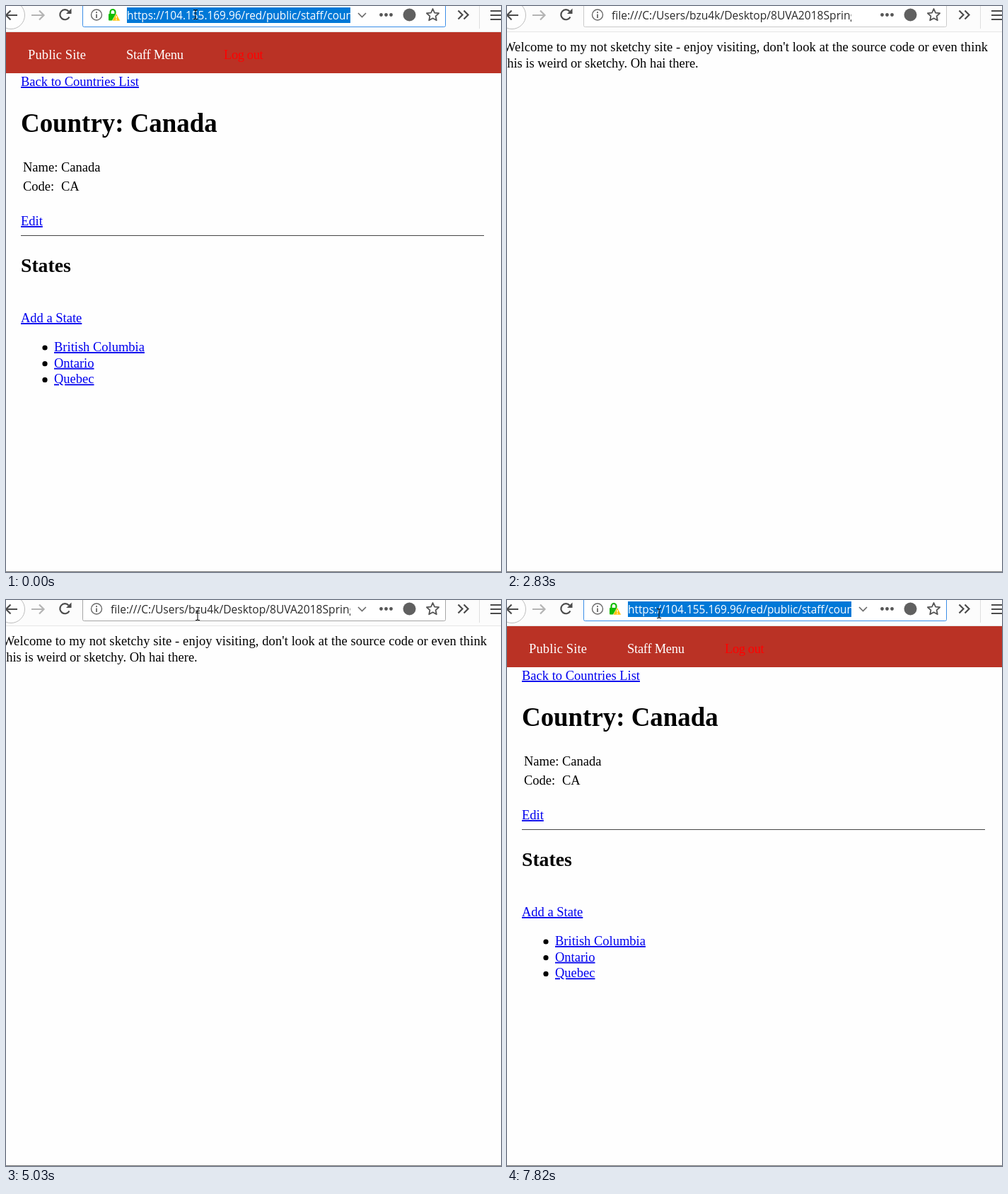
Animation of 700 by 800 pixels, one loop 8 s. Source, as an HTML page:

```html
<!DOCTYPE html>
<html lang="en">
<head>
<meta charset="utf-8">
<title>Browser tabs</title>
<style>
  html, body { margin: 0; width: 100%; height: 100%; overflow: hidden; background: #fefefe; }
  svg { display: block; }
  text { white-space: pre; }
  .page text { font-family: "Liberation Serif", "Times New Roman", serif; font-size: 18.5px; }
  .page .h1 { font-size: 36.9px; font-weight: bold; }
  .page .h2 { font-size: 27.7px; font-weight: bold; }
  .nav text { fill: #fff; }
  .nav .out { fill: #f00; }
  .link { fill: #00e; text-decoration: underline; }
  .url { font-family: "Open Sans", "Noto Sans", sans-serif; font-size: 15.4px; fill: #8b8b8b; }
  .url .host { fill: #111; }
  .file { font-size: 15.6px; fill: #2a2a2a; }
  .picked .url, .picked .host { fill: #fff; }
  .icon { fill: none; stroke: #4b4b4b; stroke-width: 2.2; }
</style>
</head>
<body>
<svg width="700" height="800" viewBox="0 0 700 800">
  <defs>
    <clipPath id="field"><rect x="145" y="0" width="342" height="29"/></clipPath>
  </defs>

  <g class="page" id="country">
    <rect y="37" width="700" height="58" fill="#ba3225"/>
    <g class="nav">
      <text x="31" y="74.5" letter-spacing=".12">Public Site</text>
      <text x="170" y="74.5" letter-spacing="-.27">Staff Menu</text>
      <text x="308" y="74.5" letter-spacing="-.4" class="out">Log out</text>
    </g>
    <text x="21" y="113" class="link">Back to Countries List</text>
    <text x="21" y="178" class="h1">Country: Canada</text>
    <text x="24" y="234">Name:</text><text x="78" y="234">Canada</text>
    <text x="24" y="261">Code:</text><text x="78" y="261">CA</text>
    <text x="21" y="310" class="link">Edit</text>
    <rect x="21" y="324" width="655" height="1" fill="#444"/>
    <text x="21" y="376" class="h2">States</text>
    <text x="21" y="447" class="link">Add a State</text>
    <g id="states"></g>
  </g>

  <g class="page" id="sketchy">
    <text x="-5" y="64" letter-spacing=".1">Welcome to my not sketchy site - enjoy visiting, don't look at the source code or even think</text>
    <text x="-5" y="87">this is weird or sketchy. Oh hai there.</text>
  </g>

  <rect y="799" width="700" height="1" fill="#777"/>

  <g id="toolbar">
    <rect width="700" height="37" fill="#fcfcfc"/>
    <rect y="36" width="700" height="1" fill="#e6e6e6"/>
    <circle cx="7" cy="13" r="19.5" fill="#fefefe" stroke="#bdbdbd"/>
    <path class="icon" d="M16 13H0M6.500 6.500L0 13L6.500 19.500"/>
    <path class="icon" style="stroke:#b4b4b4" d="M36 13H53M47 6.500L53.500 13L47 19.500"/>
    <g id="reload">
      <path class="icon" d="M89.500 15.500A7 7 0 1 1 88.500 7.500"/>
      <path d="M92.500 3.500V11H85z" fill="#4b4b4b"/>
    </g>
    <path id="stop" class="icon" d="M77.500 6.500l12 12m0-12l-12 12"/>

    <rect id="bar" x="108.500" y="-6" width="513" height="35.500" rx="2" fill="#fff"/>
    <g fill="none" stroke="#6a6a6a" stroke-width="1.4">
      <circle cx="128" cy="12.500" r="7.500"/>
      <path d="M128 11.500V17M128 8V10" stroke-width="1.800"/>
    </g>
    <g id="lock">
      <path d="M147.500 12V8.500a3.500 3.500 0 0 1 7 0V11" fill="none" stroke="#12bc00" stroke-width="2.200"/>
      <rect x="145" y="11" width="11.500" height="9.500" rx="1" fill="#12bc00"/>
      <path d="M156 10.500L161.500 21H150z" fill="#ffbf00" stroke="#fff" stroke-width=".6"/>
      <path d="M156 14V17.500M156 18.500V20" stroke="#fff" stroke-width="1.300"/>
    </g>

    <g id="address" clip-path="url(#field)">
      <rect id="mark" y="2" width="340" height="22" fill="#0078d7"/>
      <text id="web" class="url" x="171" y="18.500">https://<tspan class="host">104.155.169.96</tspan>/red/public/staff/country</text>
      <text id="local" class="url file" x="148" y="18.500">file:///C:/Users/bzu4k/Desktop/8UVA2018Spring</text>
    </g>

    <path id="chevron" class="icon" style="stroke:#6a6a6a;stroke-width:1.600" d="M498 10L503.500 15.500L509 10"/>
    <g fill="#555">
      <circle cx="530.500" cy="12.500" r="2.400"/>
      <circle cx="537.500" cy="12.500" r="2.400"/>
      <circle cx="544.500" cy="12.500" r="2.400"/>
      <circle cx="570.500" cy="12.500" r="9" fill="#606060"/>
    </g>
    <path id="star" class="icon" style="stroke:#555;stroke-width:1.800" stroke-linejoin="round"/>
    <path class="icon" d="M639.500 6.500L645.500 12.500L639.500 18.500M647.500 6.500L653.500 12.500L647.500 18.500"/>
    <rect x="669" width="1" height="32" fill="#dedede"/>
    <path class="icon" d="M685 7H700M685 13H700M685 19H700"/>
  </g>

  <g id="beam">
    <path d="M-3 -6.500H-1L0 -5.500L1 -6.500H3M0 -5.500V5.500M-3 6.500H-1L0 5.500L1 6.500H3" fill="none" stroke="#111" stroke-width="1.100"/>
  </g>
  <path id="arrow" d="M0 0V16L4 12.500L6.500 18.500L9 17.500L6.500 11.500H11.500z" fill="#fff" stroke="#000"/>
</svg>
<script>
const LOOP = 8000;
const el = id => document.getElementById(id);
const show = (id, on) => { el(id).style.display = on ? '' : 'none'; };

el('states').innerHTML = ['British Columbia', 'Ontario', 'Quebec'].map((name, i) => {
  const y = 488 + 22.7 * i;
  return `<circle cx="55" cy="${y - 5}" r="3.600"/><text x="68" y="${y}" class="link">${name}</text>`;
}).join('');

el('star').setAttribute('d', 'M' + Array.from({ length: 10 }, (_, i) => {
  const r = i % 2 ? 4.3 : 9, a = Math.PI * (i / 5 - 0.5);
  return `${(603.5 + r * Math.cos(a)).toFixed(2)} ${(13 + r * Math.sin(a)).toFixed(2)}`;
}).join('L') + 'z');

const BORDER = { idle: '#cacaca', hover: '#a6a6a6', focus: '#3b8ee8' };

// time, page, address bar, chevron opacity, pointer [x, y, shape], reload opacity
const STEPS = [
  [0,    'country', 'focus', 1,   [268, 12, 'beam']],
  [540,  'country', 'hover', 1,   [268, 12, 'beam']],
  [660,  'country', 'hover', 1,   [268, 12, 'beam'], 0],
  [910,  'country', 'hover', 1,   [268, 12, 'beam'], 0.5],
  [1030, 'country', 'hover', 1,   [268, 12, 'beam']],
  [1310, 'country', 'hover', 1,   [269, 22, 'beam']],
  [1430, 'country', 'idle',  0.7, [272, 48, 'arrow']],
  [1550, 'country', 'idle',  0.3, [276, 81, 'arrow']],
  [1680, 'country', 'idle',  0],
  [2830, 'sketchy', 'idle',  0],
  [3100, 'sketchy', 'hover', 0.3, [274, 22, 'beam']],
  [3220, 'sketchy', 'hover', 0.7, [271, 18, 'beam']],
  [3350, 'sketchy', 'hover', 1,   [270, 17, 'beam']],
  [3630, 'sketchy', 'focus', 1,   [270, 17, 'beam']],
  [4260, 'sketchy', 'hover', 1,   [270, 17, 'beam']],
  [4380, 'sketchy', 'hover', 1,   [270, 17, 'beam'], 0],
  [4500, 'sketchy', 'hover', 1,   [270, 17, 'beam']],
  [5030, 'sketchy', 'hover', 1,   [271, 22, 'beam']],
  [5150, 'sketchy', 'idle',  0.8],
  [5280, 'sketchy', 'idle',  0.5],
  [5400, 'sketchy', 'idle',  0.2],
  [5520, 'sketchy', 'idle',  0],
  [7070, 'country', 'idle',  0],
  [7450, 'country', 'hover', 0.3, [219, 22, 'beam']],
  [7570, 'country', 'hover', 0.7, [216, 20, 'beam']],
  [7700, 'country', 'hover', 1,   [215, 19, 'beam']],
  [7820, 'country', 'focus', 1,   [215, 19, 'beam']],
];

function draw([, page, bar, chevron, pointer, reload = 1]) {
  const web = page === 'country', focus = bar === 'focus';
  show('country', web);
  show('sketchy', !web);
  show('web', web);
  show('local', !web);
  show('lock', web);
  show('mark', focus);
  el('mark').setAttribute('x', web ? 171 : 148);
  el('address').setAttribute('class', focus ? 'picked' : '');
  el('bar').setAttribute('stroke', BORDER[bar]);
  el('chevron').style.opacity = chevron;
  el('reload').style.opacity = reload;
  el('stop').style.opacity = 1 - reload;
  for (const shape of ['beam', 'arrow']) {
    const on = !!pointer && pointer[2] === shape;
    show(shape, on);
    if (on) el(shape).setAttribute('transform', `translate(${pointer[0]} ${pointer[1]})`);
  }
}

const start = performance.now();
let current;
function tick() {
  const t = (performance.now() - start) % LOOP;
  const step = STEPS.filter(s => s[0] <= t).pop();
  if (step !== current) draw(current = step);
  requestAnimationFrame(tick);
}
tick();
</script>
</body>
</html>
```
